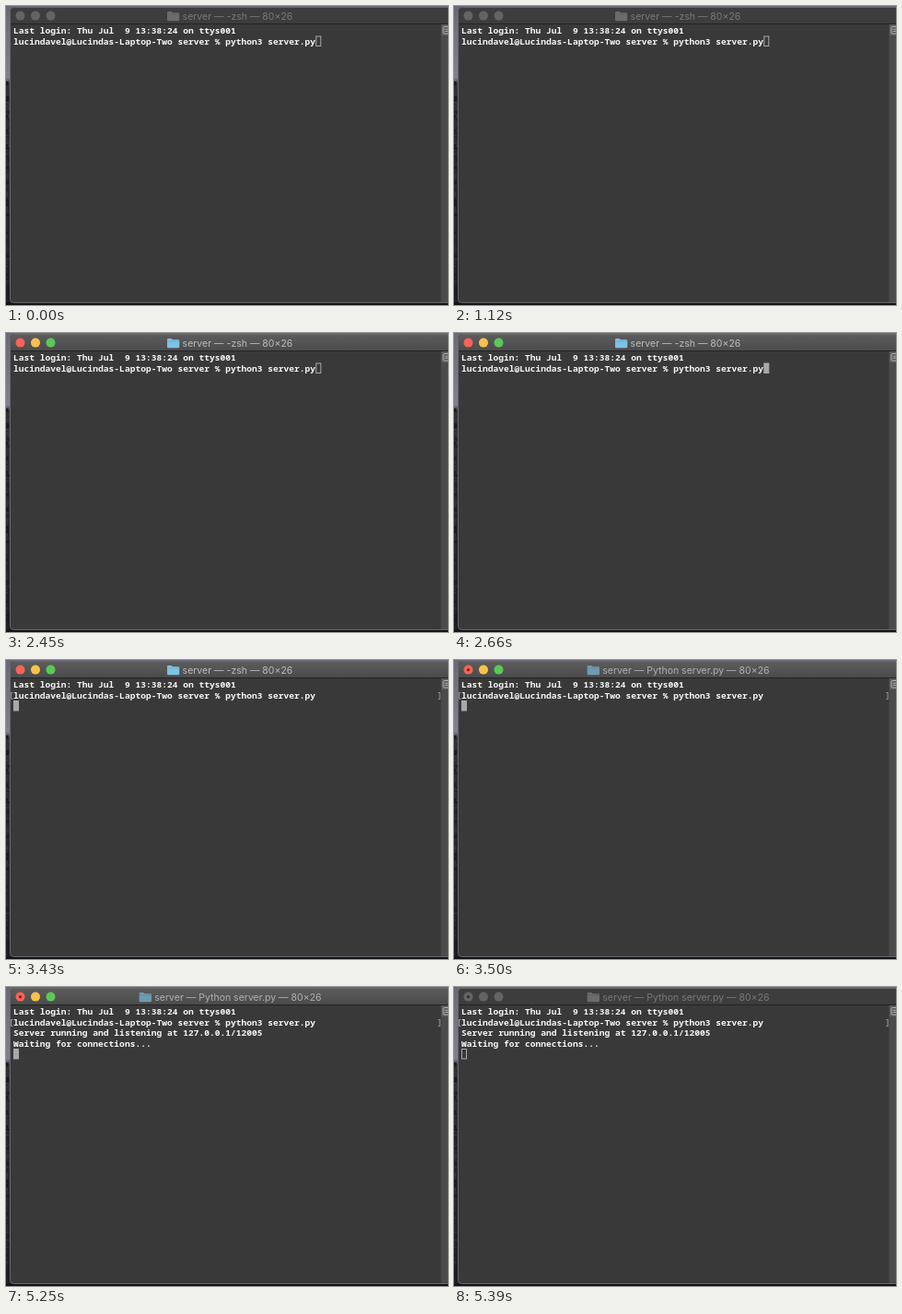
Animation of 480 by 325 pixels, one loop 8000 ms. Source, as an HTML page:

```html
<!DOCTYPE html>
<html lang="en">
<head>
<meta charset="utf-8">
<title>Terminal server</title>
<style>
  html, body { margin: 0; width: 100%; height: 100%; overflow: hidden; background: #18171b; }
  svg { display: block; width: 100vw; height: 100vh; }
  text { white-space: pre; }
  .mono { font: 700 9.6px "Noto Sans Mono", "DejaVu Sans Mono", monospace; fill: #f6f6f6; }
  .title { font: 400 10.5px Inter, Roboto, sans-serif; }
  .bracket { font-weight: 400; fill: #b5b5b5; }
</style>
</head>
<body>
<svg viewBox="0 0 480 325" preserveAspectRatio="none">
  <defs>
    <linearGradient id="sky" x2="0" y2="1">
      <stop offset="0" stop-color="#6a6878"/>
      <stop offset=".24" stop-color="#828092"/>
      <stop offset=".26" stop-color="#39373d"/>
      <stop offset=".6" stop-color="#29282c"/>
      <stop offset="1" stop-color="#1d1c20"/>
    </linearGradient>
    <linearGradient id="activeBar" x2="0" y2="1">
      <stop offset="0" stop-color="#5c5c5c"/>
      <stop offset="1" stop-color="#4b4b4b"/>
    </linearGradient>
  </defs>
  <rect width="480" height="325" fill="url(#sky)"/>
  <g id="rocks"></g>
  <rect y="323" width="480" height="2" fill="#131116"/>
  <rect x="4.5" y="1.5" width="482" height="321" rx="4" fill="#393939" stroke="#68686b"/>
  <path id="bar" d="M5 19V6Q5 2 9 2H480V19Z"/>
  <path d="M5 19.5H480" stroke="#232323"/>
  <rect x="472" y="20" width="8" height="302" fill="#4b4b4b"/>
  <path d="M472.5 20V322" stroke="#434343"/>
  <rect x="473" y="20" width="7" height="12" fill="#5e5e5e"/>
  <rect x="475" y="22.5" width="8" height="7.5" rx="1" fill="#555" stroke="#b5b5b5"/>
  <path d="M476.5 25.2H480M476.5 27.4H480" stroke="#b5b5b5"/>
  <g id="buttons"></g>
  <circle id="busy" cx="15.5" cy="10.7" r="1.6"/>
  <g id="heading">
    <path id="folder" d="M0 1Q0 0 1 0H4.5L6 1.2H12.3Q13.3 1.2 13.3 2.2V9.3Q13.3 10.3 12.3 10.3H1Q0 10.3 0 9.3Z"/>
    <path d="M0 3H13.3" stroke="#000" stroke-opacity=".15" stroke-width=".7"/>
    <text id="title" class="title" x="16.6" y="8.9"></text>
  </g>
  <g id="lines"></g>
  <g id="brackets">
    <text class="mono bracket" x="3" y="42">[</text>
    <text class="mono bracket" x="468" y="42">]</text>
  </g>
  <rect id="cursor"/>
</svg>
<script>
const LOOP = 8000;
const ACTIVATE = 2450, FOCUS = 2520, ENTER = 3430, LAUNCH = 3500, OUTPUT = 3570;
const DEACTIVATE = 5320, BLUR = 5390;
const COLUMN = 5.76, ROW = 11.5, LEFT = 8;
const $ = id => document.getElementById(id);

function add(parent, tag, attrs, text = "") {
  const node = document.createElementNS("http://www.w3.org/2000/svg", tag);
  set(node, attrs);
  node.textContent = text;
  parent.append(node);
  return node;
}

function set(node, attrs) {
  for (const key in attrs) node.setAttribute(key, attrs[key]);
}

// Rocky desktop showing beside the window
let seed = 17;
const random = () => (seed = seed * 16807 % 2147483647) / 2147483647;
for (let y = 82; y < 322; y += 4) {
  const shade = 26 + Math.floor(random() * 26);
  add($("rocks"), "rect", {
    x: 0, y, width: 2 + random() * 2, height: 1 + random() * 4,
    fill: `rgb(${shade},${shade - 1},${shade + 3})`
  });
}

const buttons = [15.5, 32, 48.5].map(cx => add($("buttons"), "circle", { cx, cy: 10.6, r: 5 }));
const lines = [
  "Last login: Thu Jul  9 13:38:24 on ttys001",
  "lucindavel@Lucindas-Laptop-Two server % python3 server.py",
  "Server running and listening at 127.0.0.1/12005",
  "Waiting for connections..."
].map((text, i) => add($("lines"), "text", { class: "mono", x: LEFT, y: 30.2 + i * ROW }, text));

function drawWindow(active, running) {
  const colors = active ? ["#f4645a", "#f7c04d", "#5bc957"] : ["#646464", "#646464", "#646464"];
  buttons.forEach((button, i) => set(button, { fill: colors[i] }));
  set($("bar"), { fill: active ? "url(#activeBar)" : "#3d3d3d" });
  set($("busy"), { fill: active ? "#8c1d18" : "#303030", visibility: running ? "visible" : "hidden" });
  set($("heading"), { transform: `translate(${running ? 144.7 : 175} 6)` });
  set($("folder"), { fill: !active ? "#6b6b6b" : running ? "#6f9bb3" : "#7cc3e4" });
  set($("title"), { fill: !active ? "#797979" : running ? "#b0b0b0" : "#bcbcbc" });
  $("title").textContent = `server — ${running ? "Python server.py" : "-zsh"} — 80×26`;
}

function drawCursor(column, row, solid) {
  set($("cursor"), {
    x: LEFT + column * COLUMN + .5, y: 21.5 + row * ROW,
    width: 5, height: 10.5,
    fill: solid ? "#a9a9a9" : "none", stroke: "#a9a9a9", "stroke-width": 1
  });
}

function render(time) {
  const entered = time >= ENTER, printed = time >= OUTPUT;
  drawWindow(time >= ACTIVATE && time < DEACTIVATE, time >= LAUNCH);
  lines.forEach((line, i) => set(line, { visibility: i < 2 || printed ? "visible" : "hidden" }));
  set($("brackets"), { visibility: entered ? "visible" : "hidden" });
  drawCursor(entered ? 0 : lines[1].textContent.length, printed ? 4 : entered ? 2 : 1,
    time >= FOCUS && time < BLUR);
}

const start = performance.now();
function tick() {
  render((performance.now() - start) % LOOP);
  requestAnimationFrame(tick);
}
tick();
</script>
</body>
</html>
```
